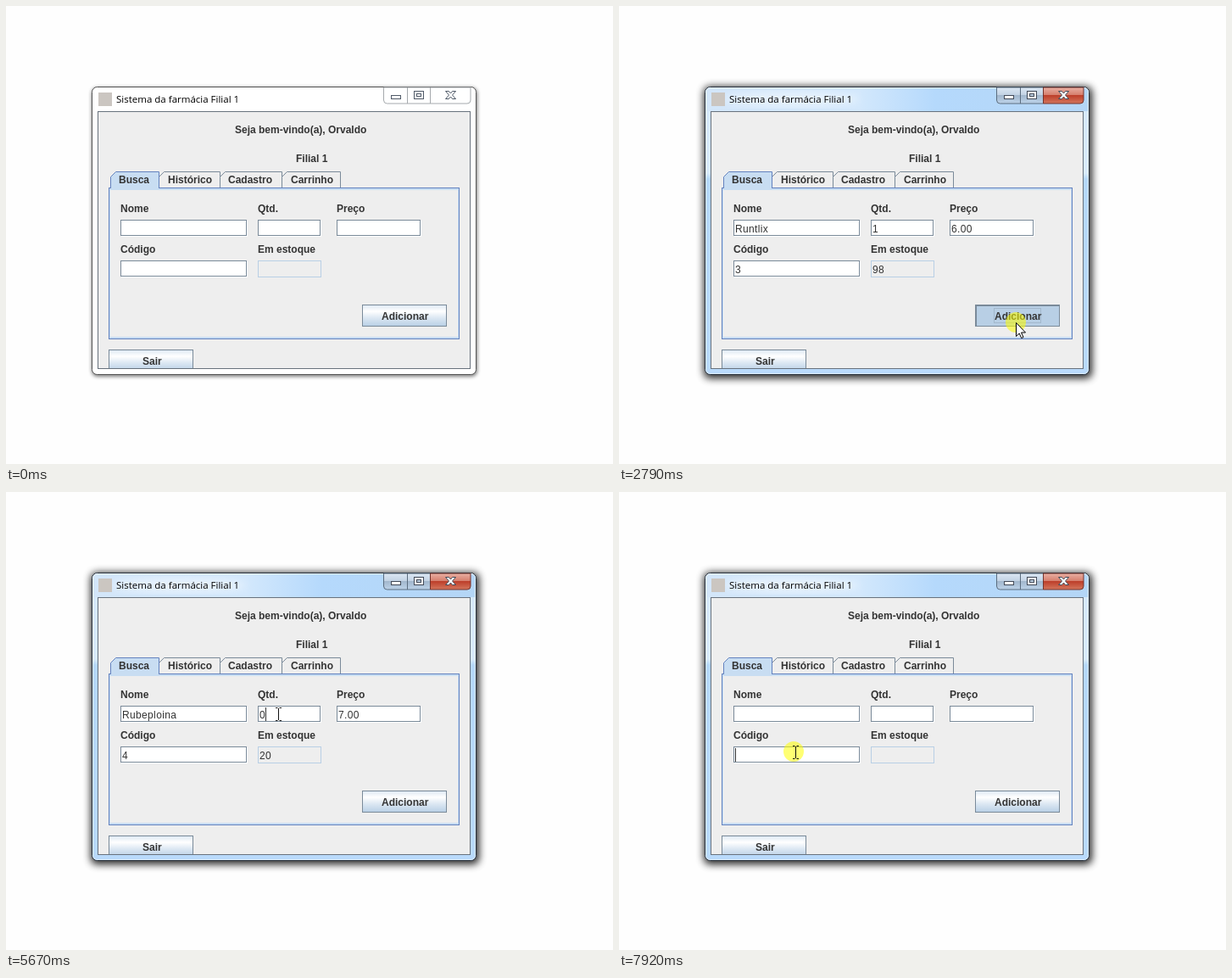
Recreate the animation shown at these times as an HTML page. Size 716x540 px, loop 8000 ms.

```html
<!DOCTYPE html>
<html lang="pt-BR">
<head>
<meta charset="utf-8">
<title>Sistema da farmácia</title>
<style>
  html, body { margin: 0; width: 100%; height: 100%; overflow: hidden; background: #fefefe; }
  svg { display: block; }
  text { white-space: pre; fill: #333; font: 12px "Liberation Sans", Arial, sans-serif; }
  .bold { font-weight: bold; }
  .value { letter-spacing: .35px; }
  .title { font: 11.5px "Open Sans", "Noto Sans", sans-serif; fill: #000; }
</style>
</head>
<body>
<svg id="stage" width="716" height="540" viewBox="0 0 716 540">
  <defs>
    <filter id="deep" x="-10%" y="-10%" width="120%" height="120%"><feGaussianBlur stdDeviation="4.6"/></filter>
    <filter id="soft" x="-10%" y="-10%" width="120%" height="120%"><feGaussianBlur stdDeviation="2"/></filter>
    <linearGradient id="aero">
      <stop offset="0" stop-color="#d3e6f9"/><stop offset=".4" stop-color="#d3e8fc"/>
      <stop offset=".6" stop-color="#b5d9fc"/><stop offset="1" stop-color="#b4d6f6"/>
    </linearGradient>
    <linearGradient id="side" x2="0" y2="1">
      <stop offset="0" stop-color="#d5e8fb"/><stop offset=".3" stop-color="#d9ebfc"/>
      <stop offset=".32" stop-color="#b5d8fa"/><stop offset="1" stop-color="#b9dafb"/>
    </linearGradient>
    <linearGradient id="ocean" x2="0" y2="1">
      <stop offset="0" stop-color="#dde8f3"/><stop offset=".3" stop-color="#fff"/>
      <stop offset=".6" stop-color="#dde8f3"/><stop offset="1" stop-color="#b8cfe5"/>
    </linearGradient>
    <linearGradient id="glass" x2="0" y2="1">
      <stop offset="0" stop-color="#dce8f4"/><stop offset=".45" stop-color="#c3d3e4"/>
      <stop offset=".5" stop-color="#a2b7cd"/><stop offset="1" stop-color="#bdd3e9"/>
    </linearGradient>
    <linearGradient id="red" x2="0" y2="1">
      <stop offset="0" stop-color="#e9b0a4"/><stop offset=".45" stop-color="#d6806f"/>
      <stop offset=".5" stop-color="#bd3f2b"/><stop offset="1" stop-color="#d4765c"/>
    </linearGradient>
    <clipPath id="client"><rect x="109" y="125" width="438" height="302"/></clipPath>
  </defs>
</svg>
<script>
const NS = "http://www.w3.org/2000/svg";
const LOOP = 8000, STEP = 90;
const stage = document.getElementById("stage");

function add(tag, attrs, parent = stage) {
  const el = document.createElementNS(NS, tag);
  for (const key in attrs) el.setAttribute(key, attrs[key]);
  return parent.appendChild(el);
}
const group = (parent = stage) => add("g", {}, parent);
const path = (d, fill, stroke, parent) => add("path", { d, fill, stroke }, parent);
const fillBox = (x, y, width, height, fill, parent) => add("rect", { x, y, width, height, fill }, parent);
// Outlined box whose one-pixel border lies inside the given size
const box = (x, y, w, h, fill, stroke, parent) =>
  add("rect", { x: x + .5, y: y + .5, width: w - 1, height: h - 1, fill, stroke }, parent);
function write(x, y, str, cls = "bold", parent = stage) {
  const el = add("text", { x, y, class: cls }, parent);
  el.textContent = str;
  return el;
}
const show = (el, on) => el.setAttribute("display", on ? "inline" : "none");

function frame(active) {
  const g = group();
  add("rect", {
    x: active ? 100 : 101, y: active ? 95 : 96, width: active ? 458 : 455, height: active ? 344 : 341,
    rx: 7, fill: "#000", opacity: active ? .85 : .5, filter: active ? "url(#deep)" : "url(#soft)"
  }, g);
  add("rect", { x: 101.5, y: 95.5, width: 453, height: 339, rx: 6,
    fill: active ? "url(#side)" : "#fff", stroke: active ? "#27313c" : "#555" }, g);
  if (active) {
    path("M102.5 124V102q0-5.500 5.500-5.500H548q5.500 0 5.500 5.500V124Z", "url(#aero)", "none", g);
    add("ellipse", { cx: 203, cy: 110, rx: 80, ry: 9, fill: "#fff", opacity: .45, filter: "url(#deep)" }, g);
    add("rect", { x: 102.5, y: 96.5, width: 451, height: 337, rx: 5, fill: "none", stroke: "#fff", opacity: .55 }, g);
  }
  const line = active ? "#5b6c7e" : "#a5a9ad";
  path("M445.500 96V111q0 4 4 4H500.500V96Z", active ? "url(#glass)" : "#fff", line, g);
  path("M500.500 96V115H544q4 0 4-4V96Z", active ? "url(#red)" : "#fff", active ? "#73332c" : line, g);
  path("M473.500 96V115", "none", line, g);
  const ink = active ? "#424a58" : "#505a68";
  box(454, 105, 12, 5, "#fff", ink, g);
  box(481, 100, 12, 10, "#fff", ink, g);
  box(484, 103, 6, 4, active ? "#b9cbdd" : "#fff", ink, g);
  path("M518.500 100.500h4l2 2.500 2-2.500h4l-4 4.500 4 4.500h-4l-2-2.500-2 2.500h-4l4-4.500Z", "#fff", ink, g);
  return g;
}

const idleFrame = frame(false), activeFrame = frame(true);
add("rect", { x: 109, y: 102, width: 16, height: 16, fill: "#cbc6c1" });
write(130, 114, "Sistema da farmácia Filial 1", "title");

box(108, 124, 440, 304, "#eee", "#68727d");
write(270, 150, "Seja bem-vindo(a), Orvaldo");
write(342, 184, "Filial 1");

// Tabs and their panel
const EDGE = "#7a8a99", BLUE = "#6382bf", PALE = "#c8ddf2";
box(121, 214, 414, 179, PALE, BLUE);
fillBox(123, 217, 410, 173, "#eee");
[[181, 253, "Histórico", 191], [253, 326, "Cadastro", 262], [326, 395, "Carrinho", 336]].forEach(([l, r, label, x]) => {
  path(`M${l - .5} 214V201.500l6-6H${r - .5}V214`, "#eee", EDGE);
  write(x, 209, label);
});
path("M123.500 215V201.500l6-6H180.500V215", PALE, BLUE);
fillBox(124, 213, 56, 4, PALE);
write(133, 209, "Busca");

// Form
function field(label, x, y, w) {
  write(x, y - 9, label);
  fillBox(x + 1, y + 1, w, 19, "#fff");
  box(x, y, w, 19, "#fff", EDGE);
  return { x, y, w, text: write(x + 2, y + 15, "", "value") };
}
const nome = field("Nome", 135, 252, 149);
const qtd = field("Qtd.", 297, 252, 74);
const preco = field("Preço", 390, 252, 99);
const codigo = field("Código", 135, 300, 149);
write(297, 291, "Em estoque");
box(297, 300, 75, 20, "#eee", "#b8cfe5");
const estoque = { text: write(299, 315, "", "value") };
const inputs = [nome, qtd, preco, codigo];

const BTN = { x: 420, y: 352, w: 100, h: 26 };
box(BTN.x, BTN.y, BTN.w, BTN.h, "url(#ocean)", EDGE);
const hover = group();
box(420, 352, 100, 26, "none", "#b8cfe5", hover);
box(421, 353, 98, 24, "none", EDGE, hover);
box(422, 354, 96, 22, "none", "#b8cfe5", hover);
const pressed = group();
box(420, 352, 100, 26, "#b8cfe5", EDGE, pressed);
path("M421 353.500H519M421.500 353V377", "none", EDGE, pressed);
const focus = box(442, 356, 56, 18, "none", "#a3b8cc");
write(443, 370, "Adicionar");

const foot = add("g", { "clip-path": "url(#client)" });
box(121, 405, 100, 26, "url(#ocean)", EDGE, foot);
write(161, 423, "Sair", "bold", foot);

const caret = fillBox(0, 0, 1, 16, "#333");
const ring = add("circle", { r: 12, fill: "#ffff00", opacity: .55 });
const arrow = path("M.5.5V16.500l3.700-3.500 2.500 5.500 2.300-1-2.500-5.500H11.500Z", "#fff", "#000");
const beam = path("M-3 -7.500H-.5M1.500-7.500H4M-3 7.500H-.5M1.500 7.500H4M.5-7V7", "none", "#111");

// Each track holds [time, value] pairs; a value lasts until the next one
const DRUG = "Rubeploina";
const typed = [[4050, 1], [4140, 2], [4320, 3], [4410, 5], [4500, 6], [4680, 7], [4770, 8], [4950, 9], [5130, 10]]
  .map(([t, n]) => [t, DRUG.slice(0, n)]);
const tracks = [
  [nome, [[0, ""], [900, "Runtlix"], [2970, ""], ...typed, [7110, ""]]],
  [qtd, [[0, ""], [900, "0"], [1980, ""], [2070, "1"], [2970, ""], [5310, "0"], [6210, ""], [6390, "4"], [7110, ""]]],
  [preco, [[0, ""], [900, "6.00"], [2970, ""], [5310, "7.00"], [7110, ""]]],
  [codigo, [[0, ""], [720, "3"], [2970, ""], [5310, "4"], [7110, ""]]],
  [estoque, [[0, ""], [900, "98"], [2970, ""], [5310, "20"], [7110, ""]]]
];
const carets = [[0, null], [450, codigo], [1170, qtd], [1530, null], [1890, qtd], [2790, null],
  [3420, nome], [3780, null], [4050, nome], [5580, qtd], [5940, null], [6210, qtd], [6930, null], [7920, codigo]];
const clicks = [[360, 540], [1170, 1260], [2790, 2970], [3420, 3510], [5580, 5670], [6930, 7110], [7920, 8000]];
const presses = [[2790, 2970], [6930, 7110]];
const focusTimes = [[2790, 3420], [6930, 7920]];
const pointer = [
  [90, 300, 451], [360, 258, 318], [450, 256, 316], [810, 256, 316],
  [1170, 332, 260], [1260, 335, 262], [1440, 335, 262], [1530, 340, 271], [2340, 340, 271],
  [2700, 468, 374], [2880, 468, 372], [2970, 464, 366], [3060, 434, 346], [3150, 434, 346],
  [3420, 236, 256], [3510, 235, 257], [5220, 235, 257],
  [5580, 323, 255], [5670, 321, 262], [5760, 321, 262], [5850, 319, 263], [6480, 319, 263],
  [6930, 454, 359], [7200, 454, 359], [7560, 305, 285], [7830, 210, 306], [7920, 208, 307]
];

const during = (spans, t) => spans.some(([from, to]) => t >= from && t < to);
const valueAt = (track, t) => track.reduce((v, [at, next]) => t >= at ? next : v, track[0][1]);
const inside = (b, x, y, h) => x >= b.x && x < b.x + b.w && y >= b.y && y < b.y + h;

function pointerAt(t) {
  const i = pointer.findIndex(p => p[0] >= t);
  if (i < 1) return i ? pointer.at(-1).slice(1) : pointer[0].slice(1);
  const [t0, x0, y0] = pointer[i - 1], [t1, x1, y1] = pointer[i];
  const k = (t - t0) / (t1 - t0), e = k * k * (3 - 2 * k);
  return [Math.round(x0 + (x1 - x0) * e), Math.round(y0 + (y1 - y0) * e)];
}

function render(now) {
  // The screen is sampled at a fixed rate
  const t = Math.floor((now % LOOP) / STEP) * STEP;
  show(idleFrame, t < 360);
  show(activeFrame, t >= 360);
  for (const [target, track] of tracks) {
    const str = valueAt(track, t);
    if (target.text.textContent !== str) target.text.textContent = str;
  }

  const owner = valueAt(carets, t);
  show(caret, owner);
  if (owner) {
    const len = owner.text.textContent ? owner.text.getComputedTextLength() : 0;
    caret.setAttribute("x", owner.x + 2 + Math.round(len));
    caret.setAttribute("y", owner.y + 2);
  }

  const [x, y] = pointerAt(t);
  const overInput = inputs.some(f => inside(f, x, y, 20));
  const move = `translate(${x} ${y})`;
  arrow.setAttribute("transform", move);
  beam.setAttribute("transform", move);
  show(arrow, t >= 90 && !overInput);
  show(beam, t >= 90 && overInput);
  ring.setAttribute("cx", overInput ? x - 2 : x);
  ring.setAttribute("cy", overInput ? y - 1 : y);
  show(ring, during(clicks, t));

  const down = during(presses, t);
  show(pressed, down);
  show(hover, !down && t >= 90 && inside(BTN, x, y, BTN.h));
  show(focus, during(focusTimes, t));
}

function tick() {
  render(performance.now());
  requestAnimationFrame(tick);
}
tick();
</script>
</body>
</html>
```
